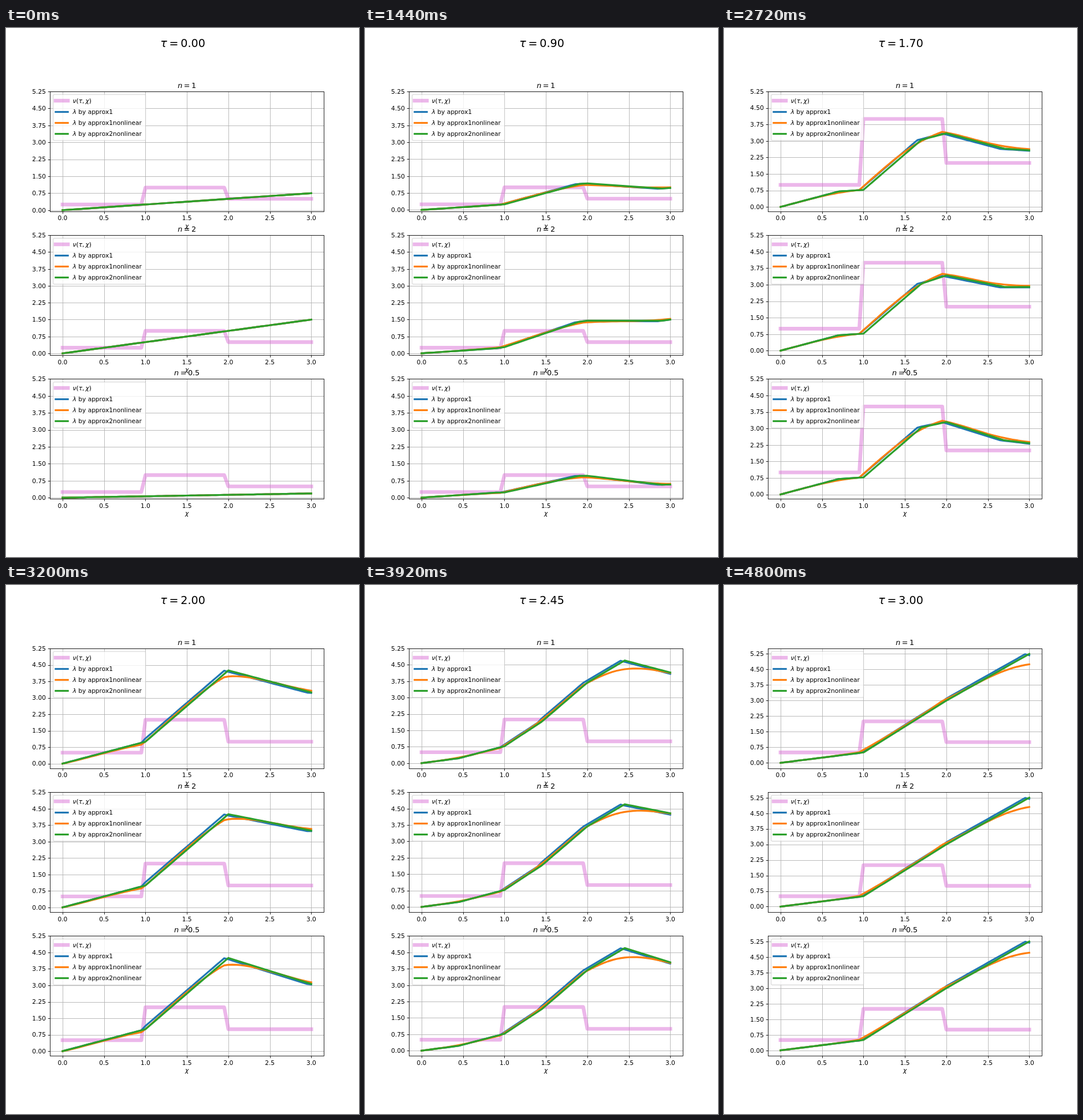
An HTML page that plays this animation: 611 by 917 pixels, repeating every 4880 ms.

```html
<!DOCTYPE html>
<html lang="en">
<head>
<meta charset="utf-8">
<title>Transport equation schemes</title>
<style>
  html, body { margin: 0; width: 100%; height: 100%; overflow: hidden; background: #fff; }
  svg { display: block; }
  text { font: 10.61px "DejaVu Sans", sans-serif; fill: #000; white-space: pre; }
  .title { font-size: 12.73px; }
  .head { font-size: 19.1px; }
  .mid { text-anchor: middle; }
  .end { text-anchor: end; }
  .i { font-style: italic; }
  .grid { stroke: #b0b0b0; stroke-width: .85; }
  .axis { stroke: #000; stroke-width: .85; fill: none; }
  .curve { fill: none; stroke-width: 3.18; stroke-linecap: square; stroke-linejoin: round; }
  .nu { stroke: orchid; stroke-width: 6.37; stroke-opacity: .5; }
  .box { fill: #fff; stroke: #ccc; stroke-width: 1.06; opacity: .8; }
</style>
</head>
<body>
<svg id="stage" width="611" height="917" viewBox="0 0 611 917"></svg>
<script>
const W = 611, H = 917, STEPS = 61, FRAME_MS = 80, D = 0.05;
const LEFT = W * 0.125, RIGHT = W * 0.9, TOP = H * 0.12;
const PLOT_H = H * 0.77 / 3.4, PITCH = PLOT_H * 1.2;
const COLORS = ['#1f77b4', '#ff7f0e', '#2ca02c'];
const NAMES = ['approx1', 'approx1nonlinear', 'approx2nonlinear'];
const GRID = Array.from({ length: STEPS }, (_, i) => i);
const YTICKS = GRID.slice(0, 8).map(i => i * 0.75);
const stage = document.getElementById('stage');

function add(parent, tag, attrs = {}, html = '') {
  const el = document.createElementNS('http://www.w3.org/2000/svg', tag);
  for (const k in attrs) el.setAttribute(k, attrs[k]);
  if (html) el.innerHTML = html;
  parent.appendChild(el);
  return el;
}
const snap = v => Math.round(v) + 0.5;
const px = x => LEFT + (RIGHT - LEFT) * (x + 0.15) / 3.3;
const it = s => `<tspan class="i">${s}</tspan>`;
// relation sign with thin spaces on both sides
const equal = (v, em) => `<tspan dx="${em * 0.2}">=</tspan><tspan dx="${em * 0.2}">${v}</tspan>`;

// piecewise constant source term on grid node (j: time, i: space)
const pick = (k, vals) => vals[k < 20 ? 0 : k < 40 ? 1 : 2];
const nu = (j, i) => pick(j, [0.25, 1, 0.5]) * pick(i, [1, 4, 2]);

// explicit upwind, implicit upwind and box scheme at unit Courant number
const SCHEMES = [
  (u, j) => GRID.map(i => i ? u[i - 1] + D * nu(j, i) : 0),
  (u, j) => {
    const v = [0];
    for (let i = 1; i < STEPS; i++) v[i] = (u[i] + v[i - 1] + D * nu(j + 1, i)) / 2;
    return v;
  },
  (u, j) => GRID.map(i => i ? u[i - 1] + D * nu(j, i - 1) : 0)
];

function solve(n) {
  const start = GRID.map(i => 0.25 ** (1 / n) * i * D);
  let state = SCHEMES.map(() => start);
  return GRID.map(j => {
    if (j) state = state.map((u, s) => SCHEMES[s](u, j - 1));
    return [GRID.map(i => nu(j, i)), ...state];
  });
}

function addLegend(g, top) {
  add(g, 'rect', { class: 'box', x: 81.7, y: top + 5.3, width: 160, height: 79.6, rx: 2.1 });
  const row = (k, cls, color, label) => {
    const yc = top + 16 + 19 * k;
    const y = k ? snap(yc) : Math.round(yc);
    add(g, 'path', { class: cls, stroke: color, d: `M85.9 ${y}H107.1` });
    add(g, 'text', { x: 115.6, y: Math.round(yc + 3.7) }, label);
  };
  row(0, 'curve nu', 'orchid', `${it('ν')}(${it('τ')},<tspan class="i" dx="2.1">χ</tspan>)`);
  NAMES.forEach((name, k) => row(k + 1, 'curve', COLORS[k], `${it('λ')} by ${name}`));
}

function makePanel(n, index) {
  const top = TOP + PITCH * index, bottom = top + PLOT_H;
  const mid = (LEFT + RIGHT) / 2;
  const x0 = snap(LEFT), x1 = snap(RIGHT), y0 = snap(top), y1 = snap(bottom);
  const data = solve(n);
  const g = add(stage, 'g');

  for (let k = 0; k <= 6; k++) {
    const x = snap(px(k / 2));
    add(g, 'path', { class: 'grid', d: `M${x} ${y0}V${y1}` });
    add(g, 'path', { class: 'axis', d: `M${x} ${y1}v3.7` });
    add(g, 'text', { class: 'mid', x: px(k / 2), y: Math.round(bottom + 15.6) }, (k / 2).toFixed(1));
  }
  const ticks = YTICKS.map(v => ({
    v,
    line: add(g, 'path', { class: 'grid' }),
    mark: add(g, 'path', { class: 'axis' }),
    label: add(g, 'text', { class: 'end', x: LEFT - 7.4 }, v.toFixed(2))
  }));
  const curves = ['orchid', ...COLORS].map((c, k) =>
    add(g, 'path', { class: k ? 'curve' : 'curve nu', stroke: c }));

  add(g, 'rect', { class: 'axis', x: x0, y: y0, width: x1 - x0, height: y1 - y0 });
  add(g, 'text', { class: 'mid i', x: mid, y: Math.round(bottom + 28.9) }, 'χ');
  add(g, 'text', { class: 'mid title', x: mid, y: Math.round(top - 6.3) }, it('n') + equal(n, 12.73));
  addLegend(g, top);

  return j => {
    const sets = data[j];
    const peak = Math.max(...sets.flat());
    const lo = -0.05 * peak, hi = Math.max(5.25, 1.05 * peak);
    const py = v => bottom - PLOT_H * (v - lo) / (hi - lo);
    for (const t of ticks) {
      const y = py(t.v);
      t.line.setAttribute('d', `M${x0} ${snap(y)}H${x1}`);
      t.mark.setAttribute('d', `M${x0} ${snap(y)}h-3.7`);
      t.label.setAttribute('y', Math.round(y + 3.86));
    }
    sets.forEach((u, k) => curves[k].setAttribute('d',
      'M' + u.map((v, i) => `${px(i * D).toFixed(2)} ${py(v).toFixed(2)}`).join('L')));
  };
}

const head = add(stage, 'text', { class: 'mid head', x: 306, y: 33 });
const panels = [1, 2, 0.5].map(makePanel);
const start = performance.now();
let shown = -1;

function tick() {
  const j = Math.floor((performance.now() - start) / FRAME_MS) % STEPS;
  if (j !== shown) {
    shown = j;
    head.innerHTML = it('τ') + equal((j * D).toFixed(2), 19.1);
    panels.forEach(draw => draw(j));
  }
  requestAnimationFrame(tick);
}
tick();
</script>
</body>
</html>
```
